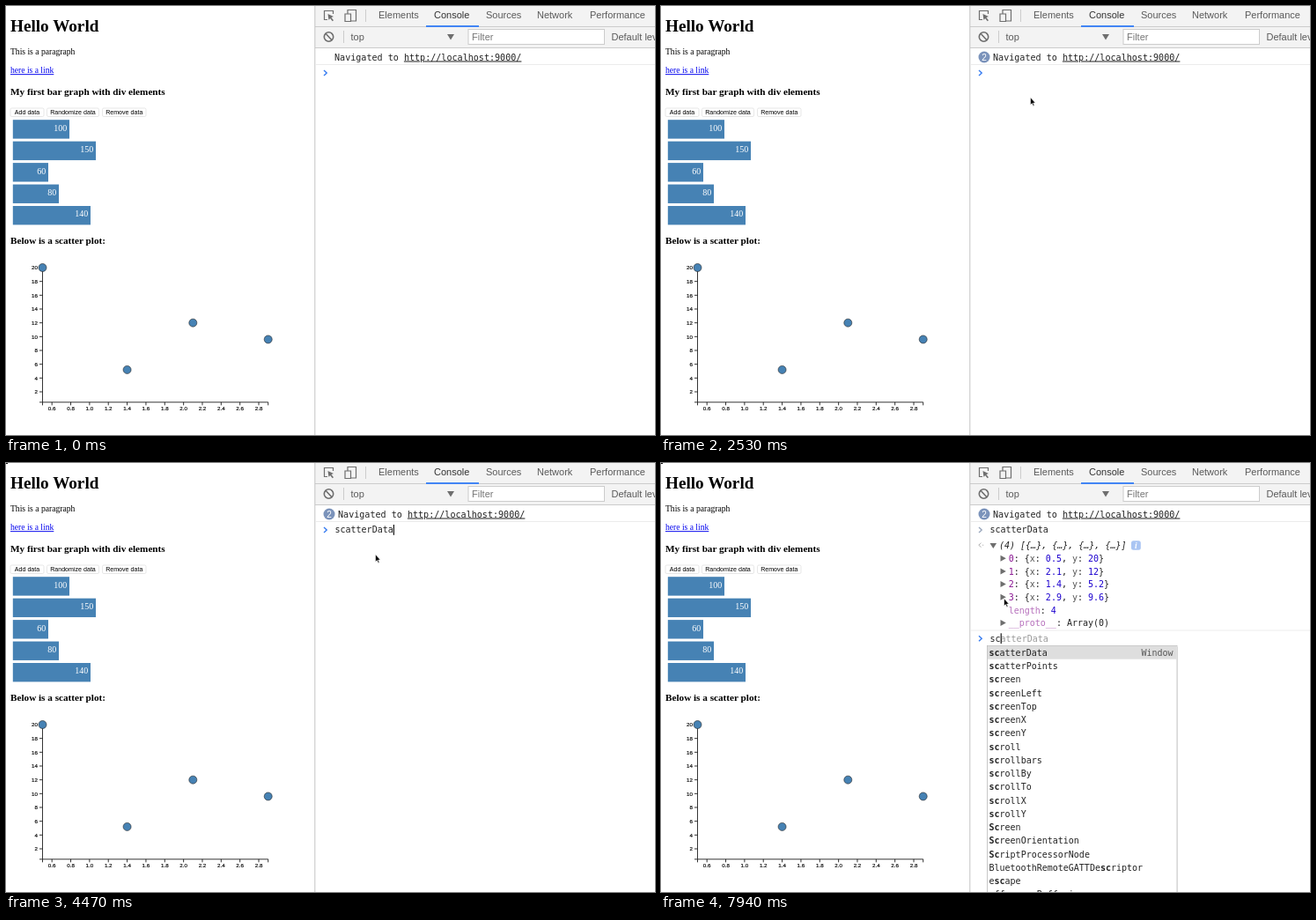
Recreate the animation shown at these times as an HTML page. Size 737 by 487 pixels, loop 8000 ms.

```html
<!DOCTYPE html>
<html lang="en">
<head>
<meta charset="utf-8">
<title>Scatter data in the console</title>
<style>
html, body { margin: 0; width: 100%; height: 100%; overflow: hidden; background: #fff; }
svg { display: block; width: 100vw; height: 100vh; }
text { white-space: pre; }
.serif { font: 9.6px "Liberation Serif", serif; }
.h1 { font-size: 19.2px; font-weight: bold; }
.h3 { font-size: 11.2px; font-weight: bold; }
.value { font-size: 10px; fill: #fff; }
.sans { font: 11px "Liberation Sans", sans-serif; fill: #5a5a5a; }
.btn { font-size: 7.1px; fill: #000; }
.axis { font: 6.2px "Liberation Sans", sans-serif; fill: #000; stroke: #000; stroke-width: .15px; }
.mono { font: 10px "DejaVu Sans Mono", monospace; fill: #222; }
.b { font-weight: bold; }
.key { fill: #881391; }
.dim { fill: #b771bd; }
.num { fill: #1c00cf; }
.name { fill: #565656; }
.ghost { fill: #999; }
</style>
</head>
<body>
<svg viewBox="0 0 737 487">
  <rect width="737" height="487" fill="#fff"/>
  <g class="serif">
    <text class="h1" x="5" y="28.5">Hello World</text>
    <text x="5" y="55.2">This is a paragraph</text>
    <text x="5" y="76.2" fill="#0000ee" text-decoration="underline">here is a link</text>
    <text class="h3" x="5" y="101">My first bar graph with div elements</text>
    <text class="h3" x="5" y="270.3">Below is a scatter plot:</text>
  </g>
  <g id="buttons"></g>
  <g id="axes"></g>
  <g id="charts"></g>

  <rect x="351" width="386" height="47" fill="#f3f3f3"/>
  <path d="M351 23.5H737M351 47.5H737" stroke="#ccc"/>
  <path d="M350.8 0V487" stroke="#c4c4c4"/>
  <rect x="477" y="22" width="60" height="2" fill="#4285f4"/>
  <g class="sans">
    <text x="423" y="14.3">Elements</text>
    <text x="486" y="14.3" style="fill:#333">Console</text>
    <text x="545" y="14.3">Sources</text>
    <text x="603" y="14.3">Network</text>
    <text x="663" y="14.3">Performance</text>
    <text x="391.5" y="38.5">top</text>
    <rect x="525" y="26.5" width="154.5" height="17" fill="#fff" stroke="#ccc"/>
    <text x="529" y="38.5" style="fill:#777">Filter</text>
    <text x="687.5" y="38.5">Default levels</text>
  </g>
  <path d="M501 32h8l-4 6.5z" fill="#6e6e6e"/>
  <path d="M408.5 4V18M383.5 28V42" stroke="#ccc"/>
  <g fill="none" stroke="#6e6e6e" stroke-width="1.2">
    <path d="M365 15.5H361.5V5.5H371.5V9"/>
    <path d="M365.5 9l6.5 3-2.6 1 2.6 3.2-1.3 1-2.6-3.2-1.6 2z" fill="#6e6e6e" stroke="none"/>
    <path d="M388 9V4.5H397.5V17H392M385 9h6.5v8.5H385z"/>
    <path d="M362.8 31l7.4 8" stroke-width="1.6"/>
    <circle cx="366.5" cy="35" r="5.2" stroke-width="1.6"/>
  </g>
  <path d="M352 66.5H737" stroke="#ececec"/>
  <g id="console"></g>
  <g id="pointer"><path d="M0 0V8.6L1.9 6.9 3.2 9.8 4.5 9.2 3.2 6.4H5.7Z" fill="#000" stroke="#fff" stroke-width=".6"/></g>
  <rect id="corner" width="2" height="1"/>
</svg>
<script>
const LOOP = 8000;
const el = id => document.getElementById(id);
const text = (x, y, cls, body, extra = '') => `<text x="${x}" y="${y}" class="${cls}" ${extra}>${body}</text>`;
const span = (cls, s) => `<tspan class="${cls}">${s}</tspan>`;
const path = (d, attrs) => `<path d="${d}" ${attrs}/>`;
const rect = (x, y, w, h, attrs) => `<rect x="${x}" y="${y}" width="${w}" height="${h}" ${attrs}/>`;
// latest entry of a time-ordered list
const at = (list, t) => list.filter(e => e[0] <= t).pop();

// page
const bars = [100, 150, 60, 80, 140];
const points = [[0.5, 20], [2.1, 12], [1.4, 5.2], [2.9, 9.6]];
const px = x => 41.5 + (x - 0.5) * 106.75;
const py = y => 297 + (20 - y) * 7.833;

el('buttons').innerHTML = [['Add data', 5, 38], ['Randomize data', 46.5, 59], ['Remove data', 109.5, 49.5]]
  .map(([s, x, w]) => rect(x, 116, w, 9.5, 'rx="1.5" fill="#fff" stroke="#ddd" stroke-width=".7"') +
    text(x + w / 2, 123.2, 'sans btn', s, 'text-anchor="middle"')).join('');

function drawAxes() {
  let d = 'M38 297H41.5V449.8H38M41.5 453.3V449.8H297.7V453.3', labels = '';
  for (let v = 2; v <= 20; v += 2) {
    d += `M38 ${py(v)}H41.5`;
    labels += text(36, py(v) + 2.2, 'axis', v, 'text-anchor="end"');
  }
  for (let i = 3; i <= 14; i++) {
    const x = px(i / 5);
    d += `M${x} 449.8V453.3`;
    labels += text(x, 459.3, 'axis', (i / 5).toFixed(1), 'text-anchor="middle"');
  }
  el('axes').innerHTML = path(d, 'fill="none" stroke="#111" stroke-width=".85"') + labels;
}

const ease = u => u < 0.5 ? 4 * u ** 3 : 1 - 4 * (1 - u) ** 3;
const ticks = [310, 490, 680, 870, 1080, 1300].map(t => [t]);
function growth(t, begin) {
  const tick = at(ticks, t);
  return tick ? ease(Math.min(1, Math.max(0, (tick[0] - begin) / 1000))) : 1;
}

function charts(t) {
  const grown = growth(t, 330), fallen = growth(t, 320);
  const rows = bars.map((v, i) => {
    const y = 129.2 + i * 24.45, right = 12 + 0.6 * v * grown;
    const end = Math.max(right - 2.7, 8 + 5 * String(v).length);
    return rect(7.8, y, right - 7.8, 21.4, 'fill="#4682b4"') +
      text(end, y + 12.4, 'serif value', v, 'text-anchor="end"');
  });
  const dots = points.map(([x, y]) =>
    `<circle cx="${px(x)}" cy="${297 + (py(y) - 297) * fallen}" r="4.5" fill="#4682b4" stroke="#222" stroke-width=".6"/>`);
  return rows.join('') + dots.join('');
}

// console
const shared = ('scatterData scatterPoints screen screenLeft screenTop screenX screenY scroll scrollbars ' +
  'scrollBy scrollTo scrollX scrollY').split(' ');
const hints = {
  s: [...shared, ...'self sessionStorage setInterval setTimeout speechSynthesis status statusbar'.split(' ')],
  sc: [...shared, ...('Screen ScreenOrientation ScriptProcessorNode BluetoothRemoteGATTDescriptor escape ' +
    'offscreenBuffering onscroll').split(' ')]
};
const typed = [[0, ''], [2850, 's'], [3040, 'sc'], [4470, 'scatterData'], [5270, ''], [7940, 'sc']];
const caret = [[0, 0], [2040, 1], [2530, 0], [2850, 1], [3530, 0], [4000, 1], [4950, 0], [5270, 1],
  [6080, 0], [6600, 1], [7110, 0], [7450, 1]];
const moves = [[1490, 150, 346], [1670, 290, 200], [1860, 390, 120], [2040, 420, 104], [5750, 417, 103],
  [5910, 408, 101], [6080, 396, 98], [6250, 385, 95.5], [6430, 378, 94], [6600, 376, 93],
  [6940, 378, 101], [7110, 384, 123], [7280, 389, 144], [7450, 390, 154]];

const chevron = (y, color) => path(`M361 ${y - 3}l3.2 3-3.2 3`, `fill="none" stroke="${color}" stroke-width="1.4"`);
const rightArrow = (x, y) => path(`M${x} ${y - 3.5}l6.3 3.5-6.3 3.5z`, 'fill="#6e6e6e"');
const line = y => path(`M352 ${y}H737`, 'stroke="#ececec"');

function popup(key, top) {
  const w = key === 's' ? 277 : 215.5;
  let out = rect(371, top + 1.5, w, 306, 'fill="#000" opacity=".14"') +
    rect(370.5, top, w, 305.5, 'fill="#fff" stroke="#bbb" stroke-width=".8"') +
    rect(371, top + 0.4, w - 1, 14.8, 'fill="#dedede"') +
    text(366 + w, top + 11.5, 'mono', 'Window', 'text-anchor="end" style="fill:#555"');
  hints[key].forEach((word, i) => {
    const body = word.replace(new RegExp(key, 'i'), m => span('b', m));
    out += text(372.5, top + 11.5 + i * 15.24, 'mono', body);
  });
  return out;
}

function result(open, arrow) {
  let out = chevron(76, '#9aa7bd') + text(373.5, 79, 'mono', 'scatterData') +
    path('M363.5 90.8l-2.7 2.4 2.7 2.4M365 93.2h1.2', 'fill="none" stroke="#b0b0b0"') +
    text(384, 97, 'mono', '(4) [{…}, {…}, {…}, {…}]', 'style="font-style:italic"');
  if (!open) return out + (arrow ? rightArrow(375, 93.5) : '') + line(102.5);
  out += path('M373.5 91h7.6l-3.8 6z', 'fill="#6e6e6e"') +
    rect(534, 88.3, 10.8, 10.4, 'rx="2.5" fill="#aac5f3"') +
    text(539.4, 96.8, 'serif', 'i', 'text-anchor="middle" style="fill:#fff;font-style:italic;font-weight:bold"');
  points.forEach(([x, y], i) => {
    const base = 112 + i * 14.7;
    out += rightArrow(385.5, base - 3.8) + text(394.7, base, 'mono',
      span('key', i) + ': {' + span('name', 'x') + ': ' + span('num', x) + ', ' +
      span('name', 'y') + ': ' + span('num', y) + '}');
  });
  return out + text(394.7, 170.7, 'mono', span('dim', 'length') + ': ' + span('num', 4)) +
    rightArrow(385.5, 181.6) + text(394.7, 185.3, 'mono', span('dim', '__proto__') + ': Array(0)') + line(190);
}

function consoleView(t) {
  const again = t >= 310, done = t >= 5270, open = t >= 6770;
  const input = at(typed, t)[1];
  const y = open ? 199.3 : done ? 111.8 : 76;
  let out = text(again ? 377 : 373, 61.5, 'mono', 'Navigated to ' +
    '<tspan text-decoration="underline">http://localhost:9000/</tspan>', 'style="font-size:10.08px"');
  if (again) out += '<circle cx="367" cy="58" r="6.5" fill="#7b93bb"/>' +
    text(367, 61.6, 'sans', 2, 'text-anchor="middle" style="fill:#fff;font-size:10px"');
  if (done) out += result(open, t >= 5750);
  out += chevron(y, '#367cf1');
  if (input) out += text(373.5, y + 3.3, 'mono', input + span('ghost', 'scatterData'.slice(input.length)));
  if (at(caret, t)[1]) out += rect(373.6 + input.length * 6.02, y - 6, 1.1, 11.8, 'fill="#000"');
  if (hints[input]) out += popup(input, y + 8.2);
  return out;
}

const shown = {};
function put(id, html) {
  if (shown[id] !== html) el(id).innerHTML = shown[id] = html;
}

function render(t) {
  put('charts', charts(t));
  put('console', consoleView(t));
  const pos = at(moves, t);
  el('pointer').setAttribute('visibility', pos ? 'visible' : 'hidden');
  if (pos) el('pointer').setAttribute('transform', `translate(${pos[1] - 0.5} ${pos[2] - 0.3})`);
  el('corner').setAttribute('visibility', t >= 3360 ? 'visible' : 'hidden');
}

drawAxes();
render(0);
let start;
requestAnimationFrame(function frame(now) {
  start ??= now;
  render((now - start) % LOOP);
  requestAnimationFrame(frame);
});
</script>
</body>
</html>
```
